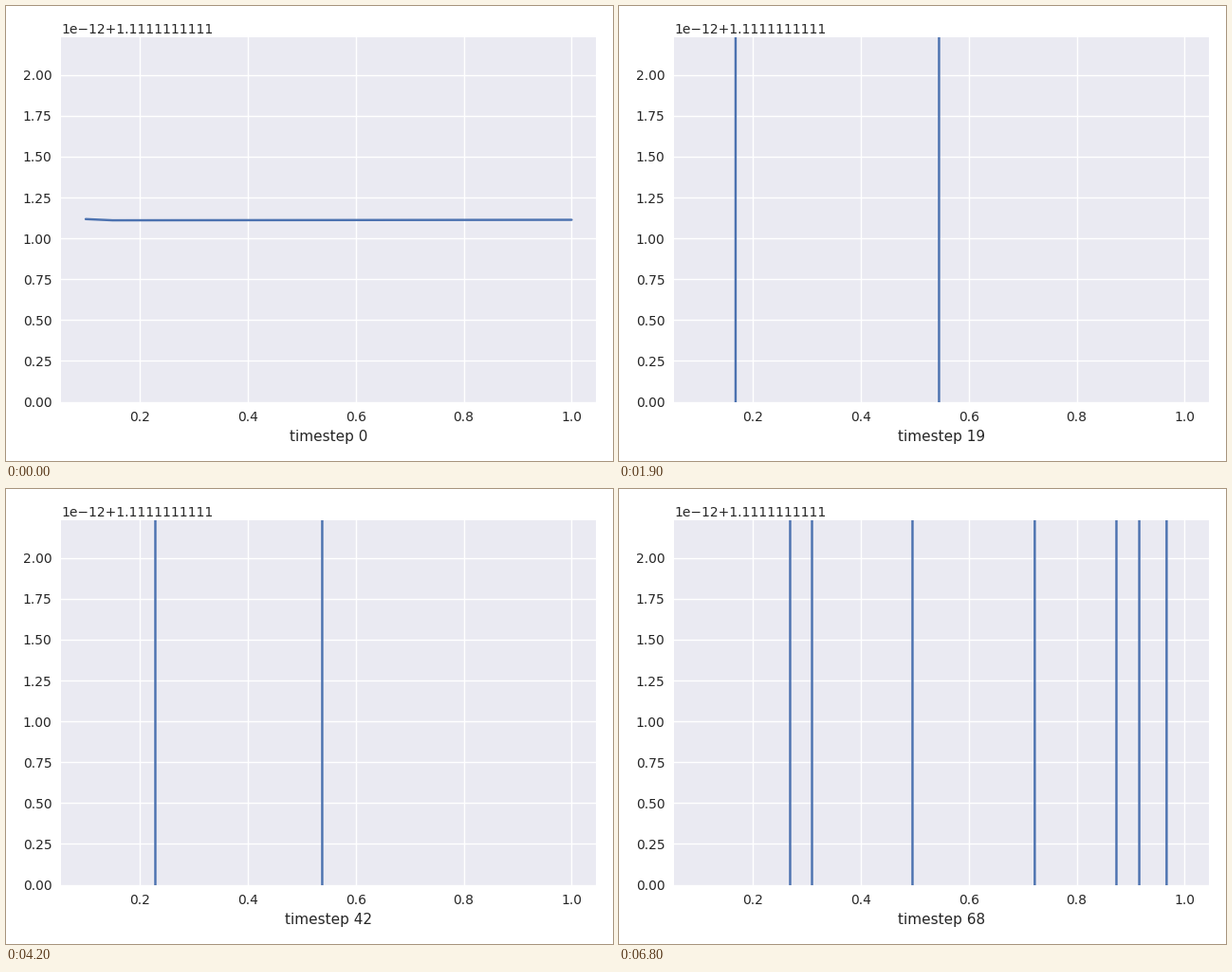
A matplotlib script for the animation above (6.9 s loop, 640x480 px).

```python
import matplotlib.pyplot as plt
import numpy as np
from matplotlib.animation import FuncAnimation

W, H, DPI = 640, 480, 100
STEPS, INTERVAL = 69, 100
CYCLE = 29  # timesteps between two waves
LEFT, RIGHT, TOP, BOTTOM = 58.4, 622, 33, 417.6
XLIM, YLIM = (0.055, 1.045), (0, 2.23)
INK, PANEL, BLUE = "0.15", "#EAEAF2", "#4C72B0"

plt.rcParams.update({
    "font.family": "DejaVu Sans",
    "text.color": INK,
    "axes.labelcolor": INK,
    "axes.labelsize": 11,
    "xtick.color": INK,
    "ytick.color": INK,
    "xtick.labelsize": 10,
    "ytick.labelsize": 10,
    "xtick.major.size": 0,
    "ytick.major.size": 0,
    "xtick.major.pad": 7,
    "ytick.major.pad": 7,
})


def middle(step):
    """Crossing that wobbles around the centre."""
    return np.interp(step, [14, 24, 33, 42, 53, 68],
                     [0.5223, 0.568, 0.4679, 0.5381, 0.5329, 0.496])


def sweep(phase):
    """Crossing that slows down as it runs to the left edge."""
    return 0.04 + 0.2294 * np.exp((10 - phase) / 15.5)


def fan(phase):
    """Crossings that drift apart on the right side."""
    start = np.array([0.7068, 0.8965, 0.9088, 0.9738])
    drift = np.array([0.0026, -0.0038, 0.0012, -0.0012])
    return start + drift * (phase - 4)


def crossings(step):
    wave, phase = divmod(step, CYCLE)
    xs = [middle(step)]
    # later waves reach the left side sooner and stay longer on the right
    if phase > 14 - 4 * wave:
        xs.append(sweep(phase))
        if phase < 13:
            xs.append(sweep(phase) + 0.0135 * (13 - phase))
    if 1 <= phase <= 5 * wave:
        xs.extend(fan(phase))
    return xs


def curve(step):
    if step == 0:
        return [0.1, 0.15, 1.0], [1.118, 1.1105, 1.1135]
    xs = crossings(step)
    return np.repeat(xs, 3), np.tile([-1, 4, np.nan], len(xs))


fig = plt.figure(figsize=(W / DPI, H / DPI), dpi=DPI, facecolor="white")
ax = fig.add_axes([LEFT / W, 1 - BOTTOM / H, (RIGHT - LEFT) / W, (BOTTOM - TOP) / H],
                  facecolor=PANEL)
ax.set(xlim=XLIM, ylim=YLIM, xticks=np.arange(0.2, 1.1, 0.2),
       yticks=np.arange(0, 2.1, 0.25))
ax.xaxis.set_major_formatter("{x:.1f}")
ax.yaxis.set_major_formatter("{x:.2f}")
ax.spines[:].set_visible(False)
ax.set_axisbelow(True)
ax.grid(color="white", linewidth=1)
ax.annotate("1e\u221212+1.1111111111", (0, 1), xycoords="axes fraction",
            xytext=(0, 3), textcoords="offset points", size=10, va="baseline")
line, = ax.plot([], [], color=BLUE, lw=1.75, solid_capstyle="round", snap=False)


def update(step):
    line.set_data(*curve(step))
    ax.set_xlabel(f"timestep {step}")
    return line, ax.xaxis.label


anim = FuncAnimation(fig, update, frames=STEPS, interval=INTERVAL,
                     init_func=lambda: update(0), repeat=True, repeat_delay=0)
plt.show()
```
